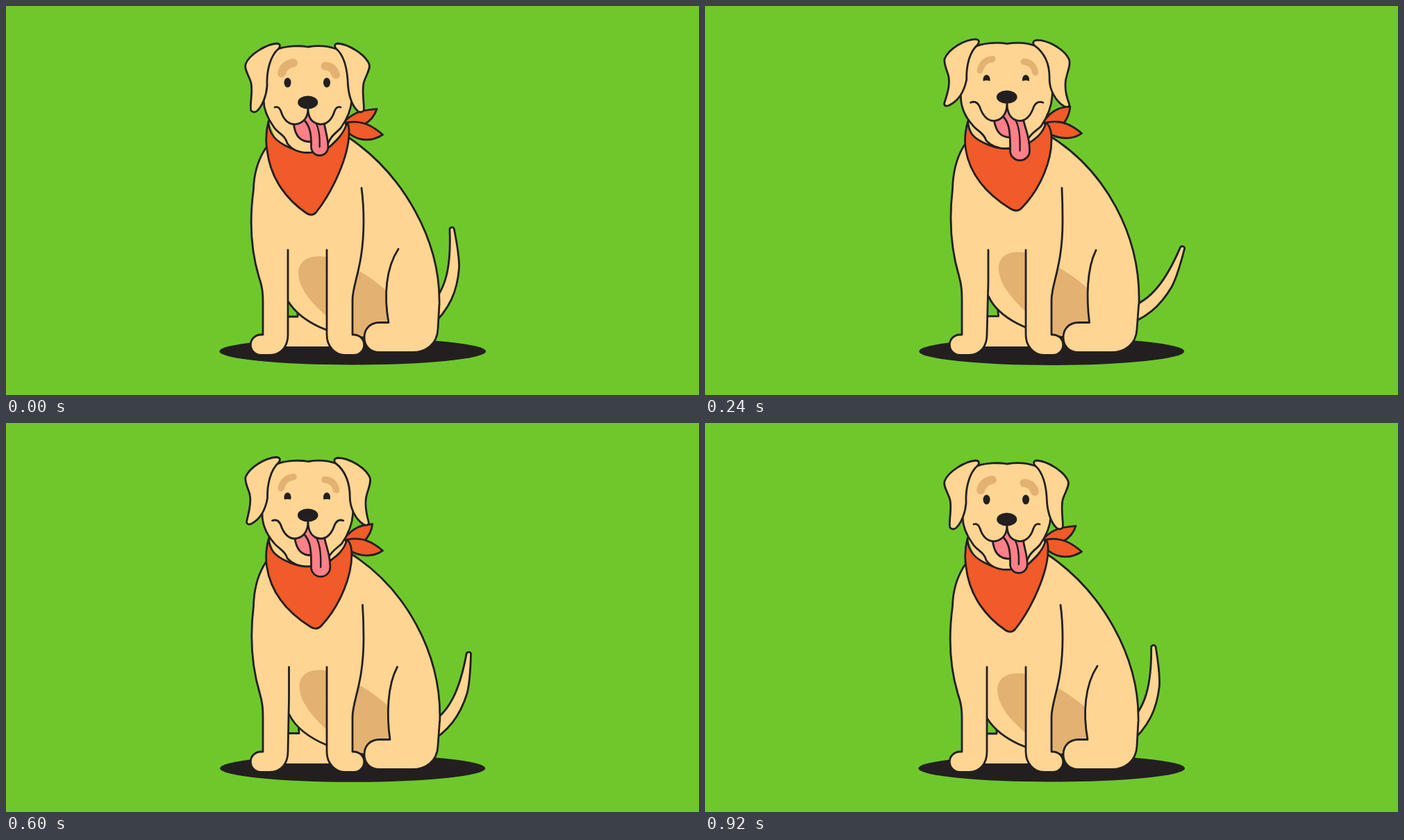
Write an HTML page that moves like this. It is 998 by 561 pixels and loops after 960 ms.

```html
<!DOCTYPE html>
<html lang="en">
<head>
<meta charset="utf-8">
<title>Happy dog</title>
<style>
  html, body { margin: 0; width: 100%; height: 100%; overflow: hidden; background: #6ec82b; }
  svg { display: block; width: 100%; height: 100%; }
</style>
</head>
<body>
<svg id="stage" viewBox="0 0 998 561" stroke-linecap="round" stroke-linejoin="round"></svg>
<script>
const INK = '#231f20', SKIN = '#fed592', SHADE = '#e3b270', RED = '#f15a29', PINK = '#ff8088';
const LOOP = 960, STEP = 40;
const stage = document.getElementById('stage');
const morphs = [];

function add(tag, attrs) {
  const el = document.createElementNS('http://www.w3.org/2000/svg', tag);
  for (const k in attrs) el.setAttribute(k, attrs[k]);
  return stage.appendChild(el);
}

// Any attribute may hold "rest>lifted" number pairs, mixed by the lift amount.
function shape(tag, attrs) {
  const el = add(tag, {});
  for (const k in attrs) {
    if (String(attrs[k]).includes('>')) morphs.push({ el, k, text: attrs[k] });
    else el.setAttribute(k, attrs[k]);
  }
  return el;
}

const path = (d, fill, width = 2.8, stroke = INK) =>
  shape('path', { d, fill, stroke: width ? stroke : 'none', 'stroke-width': width });
const oval = (cx, cy, rx, ry, fill) => shape('ellipse', { cx, cy, rx, ry, fill });

const belly = '407>409 427>414 C425>420 455>446 470 478>472 520 478';

// Ground and tail
oval('499.2', '498', '192>190.4', '19.4>20.2', INK);
const tail = path('M610 432 C634 410 641 375 639 323 A3.3 3.3 0 0 1 645.2 321 ' +
  'C650 345 653 362 652.5 378 C650 410 640 437 610 464', SKIN);

// Far foot
path('M400 448 H420>424 V425 L475 440 V480 Q475 491 462 491 H400Z', SKIN, 0);
path('M406 448>447 H420>424 L420>422 438>430', 'none');

// Torso
path(`M376 200 L360 265 V350 L372 430 L${belly} L530 485 L622 466 L624>625.5 430 ` +
  'C626>629 338>325 572>578 243>235 494>501 190>188Z', SKIN, 0);
path('M421>424 385>375 C421>424 355>345 465 352>343 508 382>373 C530 394>385 548 410>401 565 426>416 ' +
  'V476 H500 C470>473 455>445 421>424 420>410 421>424 385>375Z', SHADE, 0);
path('M' + belly, 'none');
path('M494>501 190>188 C572>578 243>235 626>629 338>325 624>625.5 430', 'none');

// Haunch and front legs
path('M565>562 350.5>353 C547>551 378>380 544>552 418>424 551>555 456.5 H538 C524 456.5 516 466 516 478 ' +
  'C516 490 524 499.5 538 499.5 H585 C604 499.5 621 488 622 466 L624>625 430', SKIN);
path('M376>374 202>197 C362>361 222>217 357 242 356.5 264 C351>352 305 352>355 350 364>367 390 ' +
  'C369>370 405>402 370 412 370 428 V474 H367 A14.7 14.7 0 0 0 367 503.4 H380 ' +
  'C397 503.4 406 490 406 474 L406>409 398 V352', SKIN);
path('M462 352 V474 C462 490 473 503.4 488 503.4 H501 A14.7 14.7 0 0 0 501 474 H499 V424 ' +
  'C499 400 515 376 515 310 Q515 285 512>515 262.5', SKIN);

// Neck and bandana
path('M378 166 L492 168 L480 200 L435 206>198 L392 200Z', SKIN, 0);
path('M488 166 C503>500 151>147 517>510 150>144 534>521.5 148.5>143 ' +
  'C531>522 158>154 525>520 166>162 515 171 L490 172Z', RED);
path('M492 168 C515 164>163 530 175>172 542.5 185.5>182.5 C530 194>192 510 198>191 492 182Z', RED);
path('M378>379 166 C374 182 374 196 376>375 208>205 C381 250>238 405 280>266 433>444 299>289 ' +
  'Q441>454 304>295 447>461 297>288 C470>490 268>262 495>506 215>222 494>501 180>186 Q494>499 172>174 491 168 ' +
  'C487 184 476 194>190 465 204>196 Q435 218>208 408 204>198 C387 195>190 378>380 183 378>379 166Z', RED);

// Head
path('M392 62>55 C405 57>50 425 57>50 435 59>52 C447 57>50 462 57>50 476 62>55 ' +
  'C498>503 75>65 499>505 110>100 498>501 135>128 C497>500 150>145 492>493 162>160 482>485 176>172 ' +
  'C476>478 183>178 468>470 186>182 464>465 198>190 C450 216>206 418>420 216>206 405 198>192 ' +
  'C402 186>182 392 184>178 386>385 175>170 C375>373 160>158 371>367 148>143 371>367 135>128 ' +
  'C370>363 110>100 371>366 75>65 392 62>55Z', SKIN);
path('M345 84>72 C350>352 70>57 375>372 55>45 390 54>44.5 Q397 55>46 393 61>52 ' +
  'C380 72>65 375>377 95>85 376>377 115>102 C375>372 130>120 369>363 144>133 362>346 151>139 ' +
  'Q357>338 155>141 353>340 151>135 C350>345 145>125 357>352 120>115 352>350 108>97 C348 97>88 343>344 90>80 345 84>72Z', SKIN);
path('M523>525 84>73 C518>517 70>58 493>495 55>46 478 54>46.5 Q471>470 55>48 475>473 61>54 ' +
  'C488>490 72>65 492>499 95>80 492.5>498 115>100 C494>497 130>115 499>508 144>134 506>523 151>141 ' +
  'Q511>531 155>144 515>530 151>137 C517>523 145>125 511>519 120>112 516>524 108>95 C520>526 97>86 525>527 90>80 523>525 84>73Z', SKIN);

// Mouth
path('M414>417 168>160 C416>420 186>178 422>427 196>186 440 196>186 L455 188>180 L460 166>158 L435 152>142Z', PINK);
const tongue = path('', PINK);
const crease = path('', 'none', 2.4);
path('M387>380 146>135.5 Q393>390 144>131.5 396>395 152>141 C400 165>155 408>407 171>163 417>416 170.5>163 ' +
  'C428 169>162 435 161>152 435 148>136', SKIN);
path('M482>489.5 146>135.5 Q476>479.5 144>131.5 473>474 152>141 C469 165>155 461>462 171>163 452>453 170.5>163 ' +
  'C441 169>162 435 161>152 435 148>136', SKIN);

// Nose, brows, eyes
oval('434.7', '139>127', '14.5>15', '9.5', INK);
path('M397>395.5 97>91 Q400>399 84>75 414 82>73.5', 'none', '12>7.5', SHADE);
path('M459.5>459 86.5>77 Q471>474 87>78 475>476 99>94', 'none', '12>7.5', SHADE);
for (const x of [405.5, 462]) {
  oval(x, '110.5>104', 5, 7, INK);
  oval(x, '126>109.5', '14>6.5', 8, SKIN);
}

const smooth = u => u * u * (3 - 2 * u);

// Swing from 0 to 1 and back, given three moments.
function swing(t, from, peak, to) {
  if (t <= from || t >= to) return 0;
  return smooth(t < peak ? (t - from) / (peak - from) : (to - t) / (to - peak));
}

const num = v => +v.toFixed(2);

function draw(t) {
  const lift = swing(t, 0, 400, 800);
  const wag = swing(t % 480, 0, 240, 480);
  const lick = swing(t, 0, 200, 400) + swing(t, 400, 700, LOOP);

  for (const { el, k, text } of morphs) {
    el.setAttribute(k, text.replace(/([\d.]+)>([\d.]+)/g, (_, a, b) => num(+a + (b - a) * lift)));
  }
  tail.setAttribute('transform', `rotate(${num(25.7 * wag)} 605 435)`);

  const up = 8 * lift, w = 12.2 + 2 * lick;
  const end = 215.5 + 12 * lick - 5.5 * lift - w;
  const right = 439.5 + 2 * w;
  tongue.setAttribute('d', `M428 ${163 - up} C437 ${172 - up} 440 ${182 - up} 439.5 ${end} ` +
    `A${w} ${w} 0 0 0 ${right} ${end} C${right} ${190 - up} 460 ${182 - up} 457 ${162 - up}`);
  crease.setAttribute('d', `M446 ${168 - up} Q${440.5 + w} ${180 - up} ${439.5 + w} ${end}`);
}

const start = performance.now();
function tick() {
  const t = (performance.now() - start) % LOOP;
  draw(Math.floor(t / STEP) * STEP);
  requestAnimationFrame(tick);
}
tick();
</script>
</body>
</html>
```
